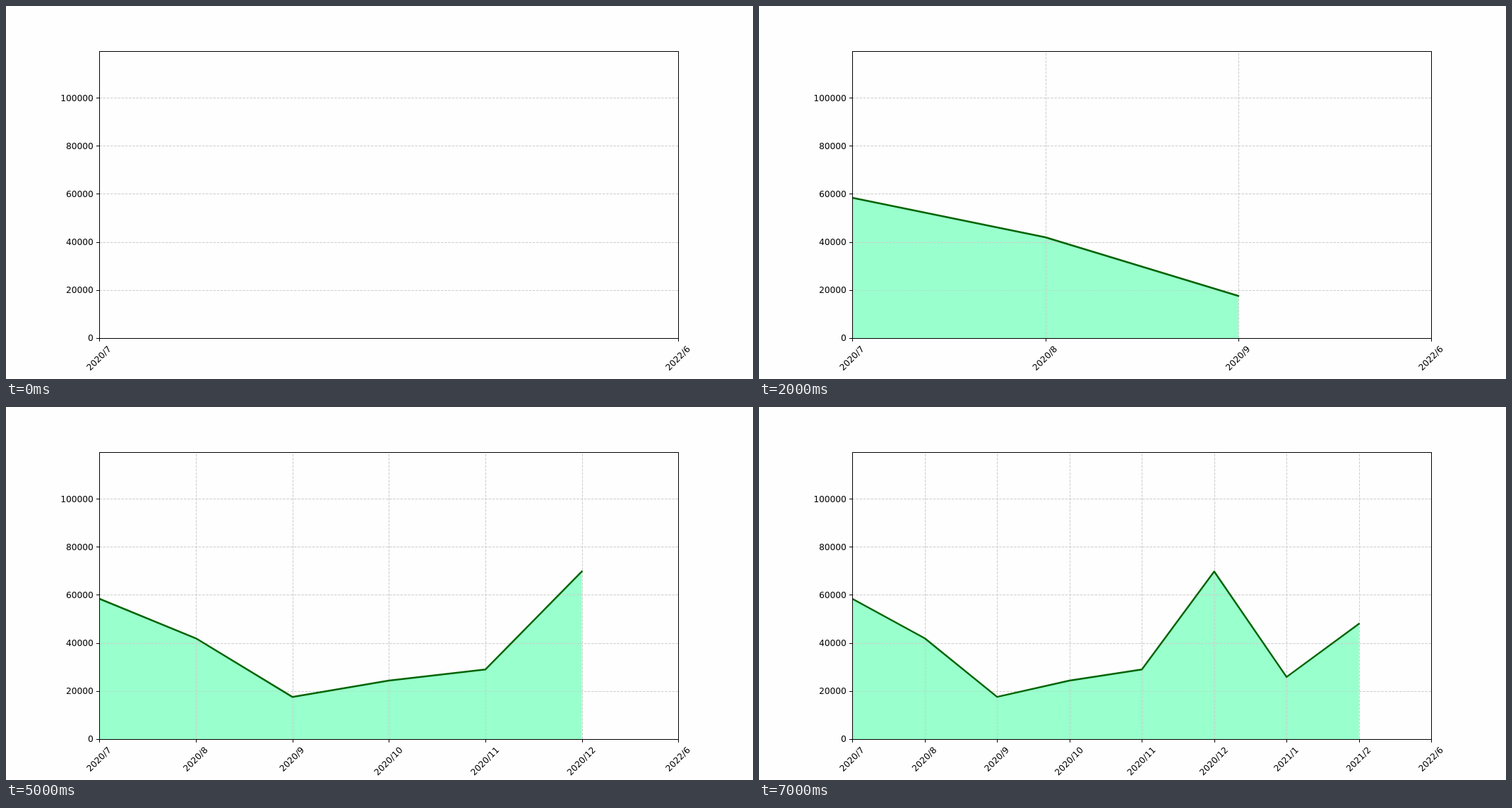
Recreate the animation shown at these times as an HTML page with a canvas. Size 1058 by 529 pixels, loop 8 s.

```html
<!DOCTYPE html>
<html lang="en">
<head>
<meta charset="utf-8">
<title>Monthly area chart</title>
<style>
  html, body { margin: 0; width: 100%; height: 100%; overflow: hidden; background: #fefefe; }
  canvas { display: block; }
</style>
</head>
<body>
<canvas id="stage" width="1058" height="529"></canvas>
<script>
const ctx = document.getElementById('stage').getContext('2d');
const STEP = 1000, STEPS = 8;
const LEFT = 132.25, RIGHT = 952.2, BOTTOM = 470.8;
const BOX = { x: 132.5, y: 64.5, w: 820, h: 407 };
const UNIT = 68.15 / 20000;
const THIN = 0.98, DASH = [3.63, 1.57], TICK = 4.3;
const values = [58350, 41900, 17500, 24300, 28900, 69700, 25800, 47900];
const months = values.map((_, i) => `${2020 + Math.floor((i + 6) / 12)}/${(i + 6) % 12 + 1}`);

const snap = v => Math.floor(v + 0.5) + 0.5;
const yOf = v => BOTTOM - v * UNIT;

function line(x1, y1, x2, y2, color, dash = []) {
  ctx.setLineDash(dash);
  ctx.lineWidth = dash.length ? THIN : 1;
  ctx.strokeStyle = color;
  ctx.beginPath();
  ctx.moveTo(x1, y1);
  ctx.lineTo(x2, y2);
  ctx.stroke();
  ctx.setLineDash([]);
}

function monthLabel(text, x) {
  ctx.save();
  ctx.textAlign = 'center';
  ctx.translate(x, 480.7 + (ctx.measureText(text).width + 12.2) / 2 / Math.SQRT2);
  ctx.rotate(-Math.PI / 4);
  ctx.fillText(text, 0, 3.2);
  ctx.restore();
}

function draw(step) {
  const xOf = i => LEFT + (RIGHT - LEFT) * i / (step + 1);
  const points = values.slice(0, step + 1).map((v, i) => [xOf(i), yOf(v)]);
  const trace = () => {
    ctx.beginPath();
    points.forEach(p => ctx.lineTo(...p));
  };

  ctx.fillStyle = '#fefefe';
  ctx.fillRect(0, 0, 1058, 529);

  ctx.save();
  ctx.beginPath();
  ctx.rect(BOX.x, BOX.y, BOX.w, BOX.h);
  ctx.clip();

  if (step) {
    trace();
    ctx.lineTo(xOf(step), 471.5);
    ctx.lineTo(LEFT, 471.5);
    ctx.fillStyle = '#99ffcc';
    ctx.fill();
  }

  for (let v = 20000; v <= 100000; v += 20000) {
    const y = snap(yOf(v));
    line(LEFT, y, RIGHT, y, '#ccc', DASH);
  }
  for (let i = 1; i <= step; i++) {
    const x = snap(xOf(i));
    line(x, BOTTOM, x, BOX.y, '#ccc', DASH);
  }

  if (step) {
    // The lowest grid line is paler across the filled area.
    ctx.save();
    trace();
    ctx.lineTo(xOf(step), BOTTOM);
    ctx.lineTo(LEFT, BOTTOM);
    ctx.clip();
    const y = snap(yOf(20000));
    line(LEFT, y, RIGHT, y, '#a5e9ca', DASH);
    ctx.restore();

    trace();
    ctx.strokeStyle = '#006400';
    ctx.lineWidth = 2.45;
    ctx.lineCap = 'square';
    ctx.lineJoin = 'round';
    ctx.stroke();
  }
  ctx.restore();

  ctx.strokeStyle = '#000';
  ctx.lineWidth = 1;
  ctx.strokeRect(BOX.x, BOX.y, BOX.w, BOX.h);

  ctx.fillStyle = '#000';
  ctx.font = '12.25px "DejaVu Sans", sans-serif';
  ctx.textAlign = 'right';
  for (let v = 0; v <= 100000; v += 20000) {
    const y = snap(yOf(v));
    line(LEFT - TICK, y, LEFT, y, '#000');
    ctx.fillText(v, 123.9, yOf(v) + 4.6);
  }
  [...months.slice(0, step + 1), '2022/6'].forEach((text, i) => {
    const x = snap(xOf(i));
    line(x, 471.5, x, 471.5 + TICK, '#000');
    monthLabel(text, xOf(i));
  });
}

function tick(now) {
  draw(Math.floor(now / STEP) % STEPS);
  requestAnimationFrame(tick);
}
draw(0);
requestAnimationFrame(tick);
</script>
</body>
</html>
```
